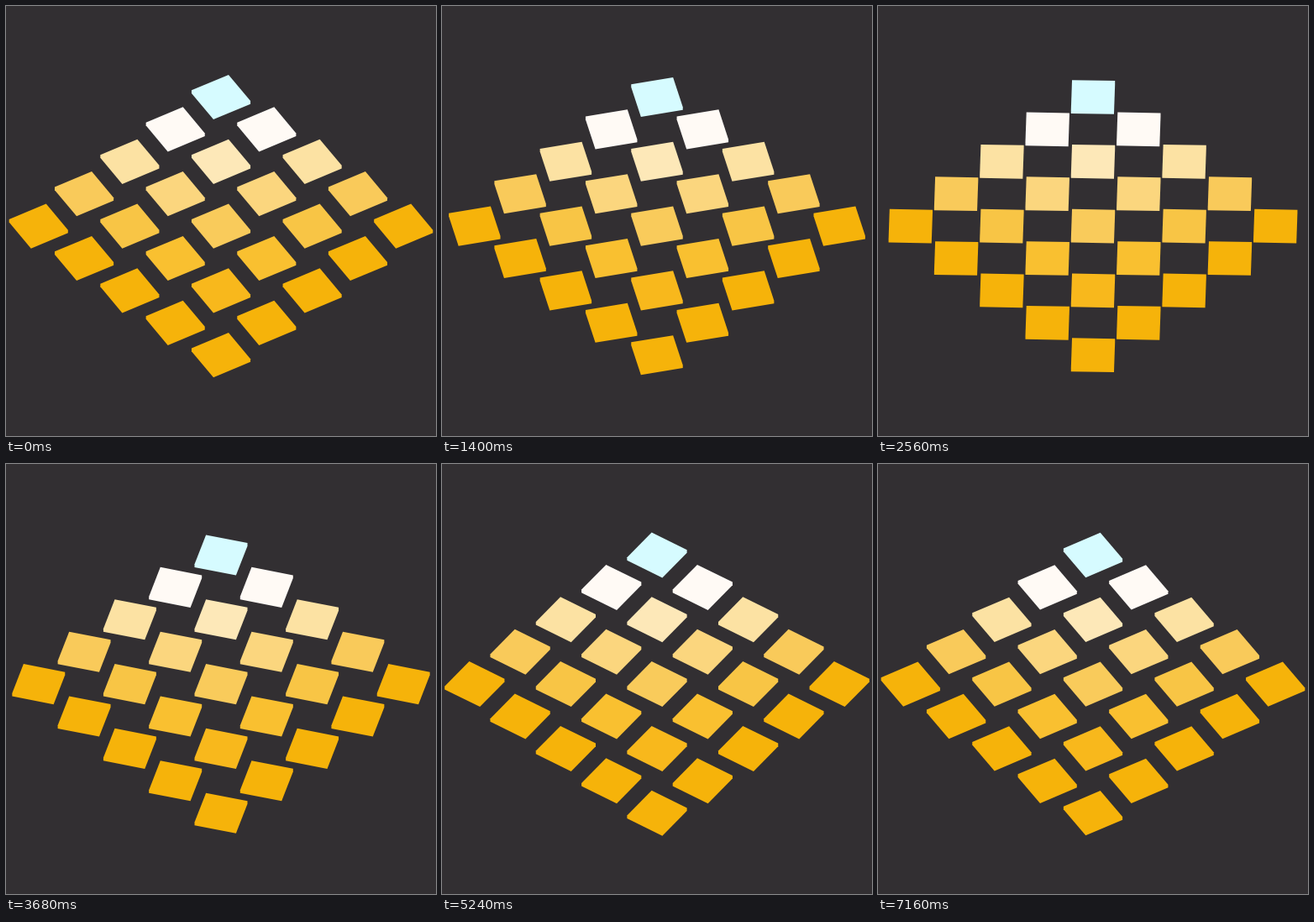
Animation of 512x512 px, one loop 7.2 s. Source, as an HTML page with a canvas:

```html
<!DOCTYPE html>
<html lang="en">
<head>
<meta charset="utf-8">
<title>Turning tiles</title>
<style>
  html, body { margin: 0; width: 100%; height: 100%; overflow: hidden; background: #322f32; }
  canvas { display: block; width: 512px; height: 512px; }
</style>
</head>
<body>
<canvas id="stage" width="512" height="512"></canvas>
<script>
const ctx = document.getElementById('stage').getContext('2d');
const LOOP = 7200, STEP = 40;
const TILT = Math.SQRT1_2;          // view from 45 degrees above
const GAP = 76.8, SIDE = 51.2;
const RADIUS = SIDE * TILT;
const HALF_DEPTH = 1.8;
const CENTER = { x: 256, y: 262.1 };
const START = 14.4;                 // degrees

// Mirrored about the vertical axis: COLORS[larger index][smaller index]
const COLORS = [
  ['#d6fbff'],
  ['#fffaf5', '#fde8b8'],
  ['#fce2a3', '#fbd67e', '#f9cb5b'],
  ['#f9ca5a', '#f8c545', '#f9c030', '#f8b81c'],
  ['#f6b30a', '#f6b30a', '#f6b30a', '#f6b30a', '#f6b30a']
];

function outline(deg) {
  const corner = (k, dy) => {
    const a = (deg + k * 90) * Math.PI / 180;
    return [RADIUS * Math.sin(a), -RADIUS * Math.cos(a) * TILT + dy];
  };
  const up = -HALF_DEPTH, down = HALF_DEPTH;
  return [corner(3, up), corner(0, up), corner(1, up),
          corner(1, down), corner(2, down), corner(3, down)];
}

function drawTile(row, col, shape) {
  const x = CENTER.x + (col - row) * GAP * TILT;
  const y = CENTER.y + (col + row - 4) * GAP * TILT * TILT;
  ctx.fillStyle = COLORS[Math.max(row, col)][Math.min(row, col)];
  ctx.beginPath();
  for (const [dx, dy] of shape) ctx.lineTo(x + dx, y + dy);
  ctx.fill();
}

function draw(time) {
  const t = Math.floor(time % LOOP / STEP) * STEP;
  let deg = START + 90 * t / LOOP;
  if (deg > 45) deg -= 90;          // keep corner 0 at the back
  const shape = outline(deg);
  ctx.fillStyle = '#322f32';
  ctx.fillRect(0, 0, 512, 512);
  for (let row = 0; row < 5; row++)
    for (let col = 0; col < 5; col++) drawTile(row, col, shape);
}

const begin = performance.now();
function tick() {
  draw(performance.now() - begin);
  requestAnimationFrame(tick);
}
tick();
</script>
</body>
</html>
```
